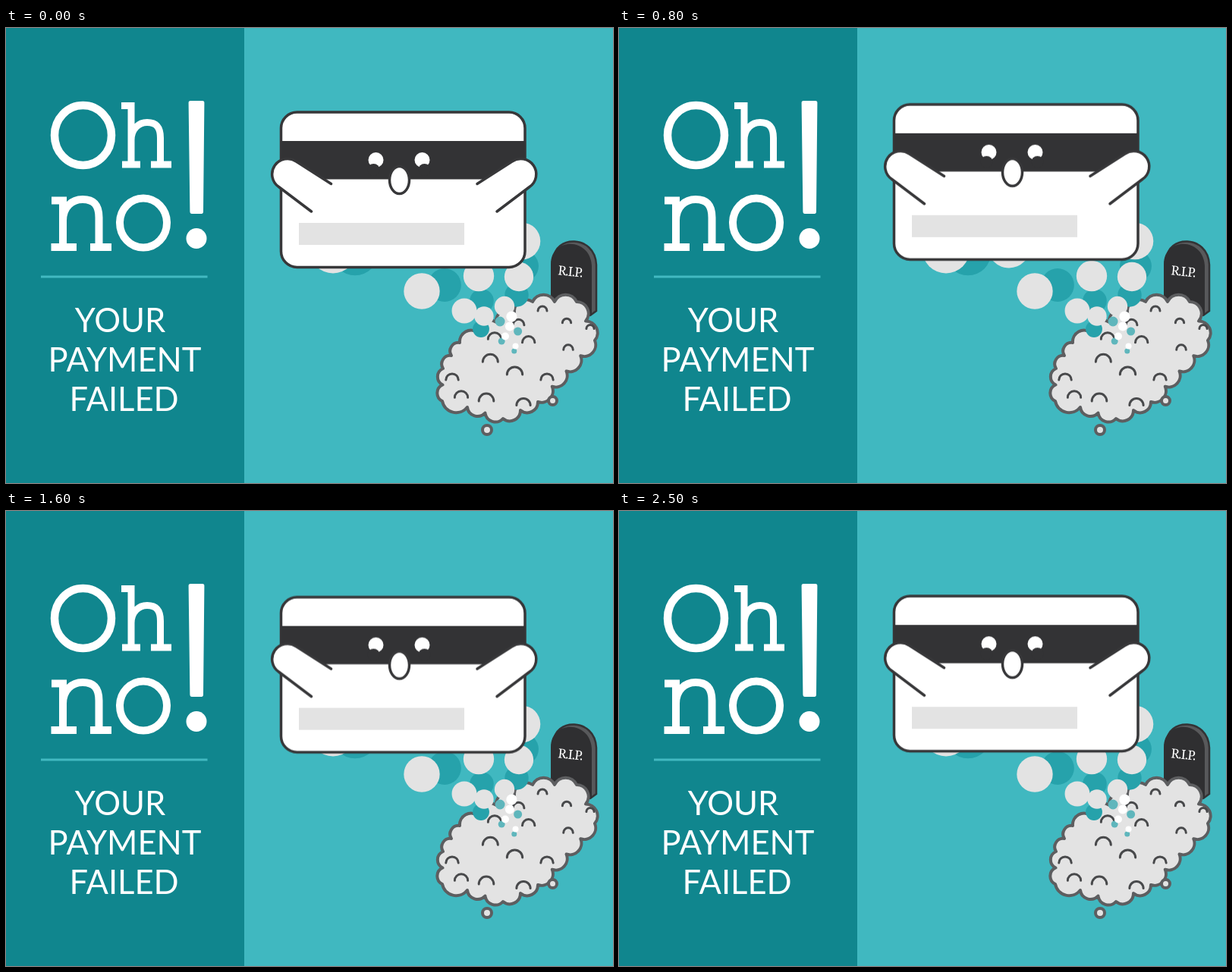
An HTML page for the animation above (2.6 s loop, 800x600 px).

```html
<!DOCTYPE html>
<html lang="en">
<head>
<meta charset="utf-8">
<title>Payment failed</title>
<style>
  html, body { margin: 0; width: 100%; height: 100%; overflow: hidden; background: #40b8c0; }
  svg { display: block; width: 800px; height: 600px; }
  .label { font: 43.5px Lato, sans-serif; fill: #fff; text-anchor: middle; }
  .rip { font: 17px "Noto Serif", serif; letter-spacing: -1px; fill: #fff; text-anchor: middle; }
  .line { fill: none; stroke: #fff; }
  .ink { stroke: #373739; stroke-width: 3.5; stroke-linecap: round; stroke-linejoin: round; }
  .soil { fill: #e3e3e3; stroke: #5d5e60; stroke-width: 4; stroke-linejoin: round; }
  .bumps { fill: none; stroke: #48494b; stroke-width: 3; stroke-linecap: round; }
  .card { animation: hover 2600ms infinite; }
  /* Ten poses a second: rise, sink, then cut back to the rise. */
  @keyframes hover {
    0%       { transform: translateY(0); animation-timing-function: steps(8, end); }
    30.7691% { transform: translateY(-12.8px); animation-timing-function: step-start; }
    30.7692% { transform: translateY(-10.2px); animation-timing-function: steps(16, end); }
    92.3076% { transform: translateY(15.4px); animation-timing-function: step-start; }
    92.3077% { transform: translateY(2.8px); animation-timing-function: steps(2, end); }
    100%     { transform: translateY(-.4px); }
  }
</style>
</head>
<body>
<svg viewBox="0 0 800 600">
  <rect width="800" height="600" fill="#40b8c0"/>
  <rect width="314" height="600" fill="#10868e"/>

  <g role="img" aria-label="Oh no!">
    <g class="line" stroke-width="10">
      <ellipse cx="101.5" cy="141.5" rx="37.5" ry="39.5" stroke-width="10.5"/>
      <path stroke-width="9" d="M152 102.500H165V180M153 180H177M165 148C165 133 175 124.500 186 124.500C199 124.500 203.500 132 203.500 145V180M191 180H218"/>
      <path d="M60 227.500H75V289M59.500 289H93M75 254C75 236 87 226 101 226C117 226 122.500 235 122.500 250V289M111 289H139"/>
      <ellipse cx="181" cy="257" rx="31" ry="32.500"/>
    </g>
    <path fill="#fff" d="M243 96H259Q261.500 96 261.400 99L260 242Q260 245 257.500 245H245Q242.500 245 242.400 242L240.600 99Q240.500 96 243 96Z"/>
    <circle cx="251" cy="277.500" r="13.500" fill="#fff"/>
  </g>
  <path d="M46 328H265.500" stroke="#42b9c1" stroke-width="3"/>
  <g class="label">
    <text x="150.500" y="401">YOUR</text>
    <text x="156.500" y="453">PAYMENT</text>
    <text x="155.500" y="505">FAILED</text>
  </g>

  <path fill="#58595b" stroke="#333335" stroke-width="2.500" d="M722 370V305C722 273 776 272 778 312V373L770 379Z"/>
  <path fill="#2f2f31" d="M718 379V311C718 276 770 275 772 314V379Z"/>
  <text class="rip" transform="translate(743 327) rotate(6)">R.I.P.</text>

  <path class="soil" id="mound"/>
  <g class="soil" stroke-width="3.500">
    <circle cx="634" cy="530" r="6"/>
    <circle cx="720.500" cy="491.500" r="5.500"/>
  </g>
  <g class="bumps" id="bumps"></g>
  <g id="smoke"></g>

  <g class="card">
    <rect class="ink" x="362.500" y="111" width="321.500" height="204.500" rx="21" fill="#fff"/>
    <rect x="362.500" y="149" width="321.500" height="50.500" fill="#333335"/>
    <rect x="386" y="257" width="218" height="29" fill="#e3e3e3"/>
    <g id="eye">
      <circle cx="487.500" cy="174" r="10" fill="#fff"/>
      <circle cx="484.500" cy="187" r="8" fill="#333335"/>
    </g>
    <use href="#eye" transform="translate(1036 0) scale(-1 1)"/>
    <ellipse class="ink" cx="518.500" cy="200.500" rx="13" ry="18" fill="#fff" stroke-width="3"/>
    <path class="ink" id="arm" fill="#fff" d="M428.500 205.500L382.500 176A20.300 20.300 0 0 0 359.500 209.500L402.500 242"/>
    <use href="#arm" transform="translate(1049.500 0) scale(-1 1)"/>
  </g>
</svg>
<script>
  const NS = "http://www.w3.org/2000/svg";
  const byId = id => document.getElementById(id);
  const mix = (a, b, k) => a + (b - a) * k;

  function add(parent, tag, attrs) {
    const el = document.createElementNS(NS, tag);
    for (const key in attrs) el.setAttribute(key, attrs[key]);
    byId(parent).appendChild(el);
  }

  // Walks a closed polygon and puts evenly spaced outward arcs on each side.
  function scallops(corners, size) {
    let d = `M${corners[0]}`;
    corners.forEach(([x, y], i) => {
      const [nx, ny] = corners[(i + 1) % corners.length];
      const length = Math.hypot(nx - x, ny - y);
      const count = Math.max(1, Math.round(length / size));
      const r = 0.55 * length / count;
      for (let j = 1; j <= count; j++) {
        d += `A${r} ${r} 0 0 1 ${mix(x, nx, j / count)} ${mix(y, ny, j / count)}`;
      }
    });
    return d + "Z";
  }
  byId("mound").setAttribute("d", scallops([
    [575, 492], [576, 449], [598, 415], [694, 361], [752, 361],
    [776, 412], [701, 493], [655, 515], [608, 500]
  ], 25));

  // Rows of bumps that shrink away from the middle of the mound
  function bumpRow(x0, y0, x1, y1, count) {
    for (let i = 0; i < count; i++) {
      const k = i / (count - 1), x = mix(x0, x1, k), y = mix(y0, y1, k);
      const r = 4.5 + 6 * Math.exp(-((Math.hypot(x - 650, y - 460) / 90) ** 2));
      add("bumps", "path", { d: `M${x - r} ${y + r / 2}a${r} ${r} 0 0 1 ${2 * r} 0` });
    }
  }
  bumpRow(644, 406, 707, 370, 3);
  bumpRow(588, 460, 739, 386, 4);
  bumpRow(600, 483, 741, 421, 3);
  bumpRow(633, 487, 713, 460, 2);
  bumpRow(682, 493, 770, 394, 2);

  // Puffs swell with their distance from the vent in the mound.
  const vent = { x: 663, y: 426 };
  function puffs(fill, centres) {
    for (const [cx, cy] of centres) {
      const away = Math.hypot(cx - vent.x, cy - vent.y);
      add("smoke", "circle", { cx, cy, fill, r: 36 * (1 - Math.exp(-away / 130)) });
    }
  }
  puffs("#26a2ab", [[460, 296], [578, 339], [627, 360], [673, 352], [681, 314], [626, 397]]);
  puffs("#e3e3e3", [
    [431, 292], [514, 288], [548, 347], [623, 327], [680, 281],
    [676, 328], [604, 373], [630, 380], [657, 367]
  ]);

  // Small sparks winding up from the vent
  for (let i = 0; i < 8; i++) {
    add("smoke", "circle", {
      cx: vent.x + 12 * Math.sin(1.75 * i + 0.6),
      cy: vent.y - 6.5 * i,
      r: 3.5 + 0.5 * i,
      fill: i % 2 ? "#fff" : "#5fb6bc"
    });
  }
</script>
</body>
</html>
```
